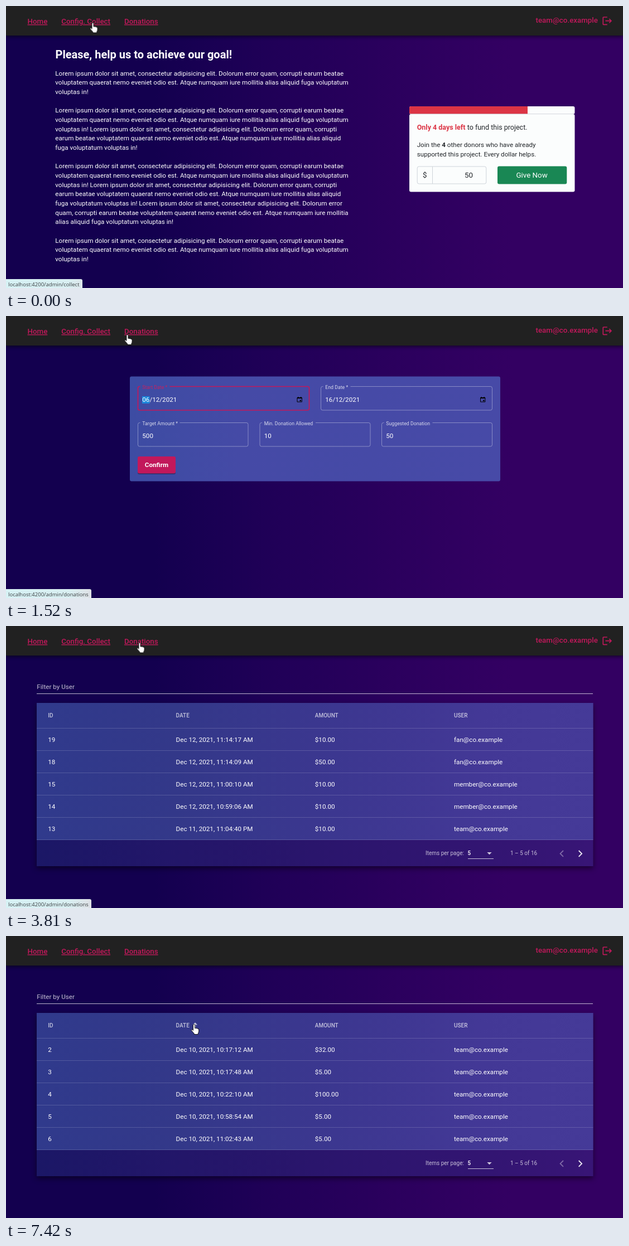
An HTML page for the animation above (8000 ms loop, 1106 px wide and 506 px high).

```html
<!DOCTYPE html>
<html lang="en">
<head>
<meta charset="utf-8">
<title>Donation admin</title>
<style>
  html, body { margin: 0; width: 100%; height: 100%; overflow: hidden; background: #1c0056; }
  body, text { font-family: Roboto, sans-serif; }
  svg { display: block; position: absolute; left: 0; top: 0; }
  text { font-size: 11.667px; fill: #fff; white-space: pre; }

  /* every change is a hard cut on one 8 s clock */
  .k { animation: 8s step-end infinite; }
  .home { animation-name: home; }
  .form { animation-name: form; }
  .panel { animation-name: panel; }
  .fields { animation-name: fields; }
  .blurred { animation-name: blurred; }
  .focused { animation-name: focused; }
  .list { animation-name: list; }
  .newest { animation-name: newest; }
  .oldest { animation-name: oldest; }
  .sort { animation-name: sort; }
  .status { animation-name: status; }
  .bar { animation-name: bar; }
  .url1 { animation-name: url1; }
  .url2 { animation-name: url2; }
  .cursor { animation-name: move; }
  .hand { animation-name: hand; }
  .arrow { animation-name: arrow; }

  @keyframes home { 0% { opacity: 1 } 6.5%, to { opacity: 0 } }
  @keyframes form { 0% { opacity: 0 } 6.5% { opacity: 1 } 47.625%, to { opacity: 0 } }
  @keyframes panel { 0% { height: 28px } 8%, to { height: 188px } }
  @keyframes fields { 0% { opacity: 0 } 8%, to { opacity: 1 } }
  @keyframes blurred { 0% { opacity: 1 } 9.5% { opacity: 0 } 44.5%, to { opacity: 1 } }
  @keyframes focused { 0% { opacity: 0 } 9.5% { opacity: 1 } 44.5%, to { opacity: 0 } }
  @keyframes list { 0% { opacity: 0 } 47.625%, to { opacity: 1 } }
  @keyframes newest { 0% { opacity: 1 } 78.5%, to { opacity: 0 } }
  @keyframes oldest { 0% { opacity: 0 } 78.5%, to { opacity: 1 } }
  @keyframes sort { 0% { opacity: 0 } 68.875% { opacity: .4 } 78.5% { opacity: .55 } 80%, to { opacity: .75 } }
  @keyframes status { 0% { opacity: 1 } 58.5%, to { opacity: 0 } }
  @keyframes bar { 0% { width: 140px } 6.5% { width: 371px } 17.5%, to { width: 156px } }
  @keyframes url1 { 0% { opacity: 1 } 17.5%, to { opacity: 0 } }
  @keyframes url2 { 0% { opacity: 0 } 17.5%, to { opacity: 1 } }
  @keyframes hand { 0% { opacity: 1 } 55.375% { opacity: 0 } 68.875%, to { opacity: 1 } }
  @keyframes arrow { 0% { opacity: 0 } 55.375% { opacity: 1 } 68.875%, to { opacity: 0 } }
  @keyframes move {
    0% { transform: translate(155.5px, 29.5px) }
    14.375% { transform: translate(160px, 30px) }
    15.875% { transform: translate(176px, 32px) }
    17.5% { transform: translate(204px, 34px) }
    19% { transform: translate(217.5px, 33px) }
    20.625% { transform: translate(226px, 32px) }
    22.125% { transform: translate(232px, 31px) }
    23.75% { transform: translate(235.5px, 30.5px) }
    25.25% { transform: translate(236.5px, 30px) }
    28.375% { transform: translate(238px, 30px) }
    29.875% { transform: translate(239px, 30px) }
    34.625% { transform: translate(239.5px, 29.5px) }
    53.875% { transform: translate(241px, 31px) }
    55.375% { transform: translate(249px, 41px) }
    57% { transform: translate(265px, 58px) }
    58.5% { transform: translate(283px, 77px) }
    59.875% { transform: translate(299px, 93px) }
    61.375% { transform: translate(310px, 106px) }
    62.875% { transform: translate(317px, 119px) }
    64.375% { transform: translate(321px, 128px) }
    65.875% { transform: translate(325px, 138px) }
    67.375% { transform: translate(330px, 147px) }
    68.875% { transform: translate(334px, 156px) }
    70.375% { transform: translate(335px, 158px) }
    92.75%, to { transform: translate(337px, 158px) }
  }

  .story { position: absolute; left: 88.3px; top: 112.5px; width: 534px; color: #fff;
           font-size: 11.667px; line-height: 16.667px; }
  .story p { margin: 0 0 16.667px; }
  .nav text { font-size: 13.333px; font-weight: 500; fill: #c2185b; }
  .nav .link { text-decoration: underline; }
  .title { font-size: 20px; font-weight: 700; }
  .card text { fill: #212529; }
  .card .big { font-size: 13.333px; }
  .card .give { font-size: 13.333px; fill: #fff; }
  .red { fill: #dc3545; }
  .bold { font-weight: 700; }
  .med { font-weight: 500; }
  .outline { fill: none; stroke: rgba(255,255,255,.36); }
  .label { font-size: 8.75px; fill: rgba(255,255,255,.78); }
  .focused .outline { stroke: #c2185b; stroke-width: 1.7; }
  .focused .label { fill: #c8205f; }
  .head { font-size: 10px; font-weight: 500; fill: rgba(255,255,255,.7); }
  .small { font-size: 10px; fill: rgba(255,255,255,.72); }
  .status text { font: 9.5px "Open Sans", sans-serif; fill: #3c4043; }
  .cursor path { fill: #fff; stroke: #000; stroke-width: .9; stroke-linejoin: round; }
</style>
</head>
<body>
<svg width="1106" height="506" viewBox="0 0 1106 506">
  <defs>
    <linearGradient id="night">
      <stop offset="0" stop-color="#13004f"/><stop offset=".24" stop-color="#13004f"/>
      <stop offset=".45" stop-color="#210058"/><stop offset=".65" stop-color="#2c005e"/>
      <stop offset=".82" stop-color="#330062"/><stop offset="1" stop-color="#330062"/>
    </linearGradient>
    <linearGradient id="indigo">
      <stop offset="0" stop-color="#3d4ca3"/><stop offset=".3" stop-color="#454aa6"/><stop offset="1" stop-color="#474aa7"/>
    </linearGradient>
    <linearGradient id="grid">
      <stop offset="0" stop-color="#303a8c"/><stop offset=".25" stop-color="#333889"/>
      <stop offset=".5" stop-color="#3b378f"/><stop offset=".8" stop-color="#433896"/><stop offset="1" stop-color="#453a98"/>
    </linearGradient>
    <linearGradient id="foot">
      <stop offset="0" stop-color="#1b1766"/><stop offset=".5" stop-color="#2a156c"/><stop offset="1" stop-color="#381576"/>
    </linearGradient>
    <linearGradient id="tip" gradientUnits="userSpaceOnUse" x1="0" x2="160" y1="0" y2="0">
      <stop offset="0" stop-color="#d6f1f4"/><stop offset=".7" stop-color="#d8eef1"/><stop offset=".95" stop-color="#dee1e6"/>
    </linearGradient>
  </defs>
  <rect width="1106" height="506" fill="url(#night)"/>

  <g class="k home">
    <text class="title" x="88.5" y="94">Please, help us to achieve our goal!</text>
    <g class="card">
      <rect x="723" y="180" width="296.5" height="14" rx="3" fill="#fbfdfd"/>
      <path class="red" d="M935 180H726q-3 0-3 3v8q0 3 3 3H935z"/>
      <rect x="723" y="194" width="296.5" height="139.5" rx="3" fill="#fbfdfd"/>
      <path d="M724 193.7H1018" stroke="#c9ccd6" stroke-width=".8"/>
      <text x="736.7" y="222" style="font-size:12.5px"><tspan class="red bold">Only 4 days left</tspan> to fund this project.</text>
      <text x="736.7" y="253">Join the <tspan class="bold">4</tspan> other donors who have already</text>
      <text x="736.7" y="270">supported this project. Every dollar helps.</text>
      <rect x="737.2" y="288" width="123.6" height="31" rx="3" fill="#fbfdfd" stroke="#ced4da"/>
      <path d="M764.5 288V319" stroke="#ced4da"/>
      <text class="big" x="747" y="308">$</text>
      <text class="big" x="822" y="308">50</text>
      <rect x="881" y="287.5" width="124.3" height="32" rx="3" fill="#198754"/>
      <text class="give" x="914.5" y="308">Give Now</text>
    </g>
  </g>

  <g class="k form">
    <rect class="k panel" x="222" y="108.5" width="664" height="188" rx="3" fill="url(#indigo)"/>
    <g class="k fields">
      <g id="fields"></g>
      <rect x="236" y="253" width="68" height="31" rx="3" opacity=".35"/>
      <rect x="236" y="252" width="68" height="30.5" rx="3" fill="#c2185b"/>
      <text class="bold" x="248.8" y="271">Confirm</text>
    </g>
  </g>

  <g class="k list">
    <text x="55.3" y="112.5" fill-opacity=".75">Filter by User</text>
    <path d="M55 121.5H1052" stroke="#fff" stroke-opacity=".72"/>
    <rect x="55" y="138" width="997.5" height="293" fill="url(#foot)" style="filter:drop-shadow(0 4px 5px rgba(0,0,0,.5))"/>
    <rect x="55" y="138" width="997.5" height="246" fill="url(#grid)"/>
    <path d="M55 183.5h997.5m-997.5 40h997.5m-997.5 40h997.5m-997.5 40h997.5m-997.5 40h997.5m-997.5 40h997.5" stroke="#fff" stroke-opacity=".16"/>
    <g id="table"></g>
    <path class="k sort" d="M335.8 159.5l3.2-3.2 3.2 3.2M339 156.5V165" fill="none" stroke="#fff" stroke-width="1.6"/>
    <text class="small" x="752" y="411">Items per page:</text>
    <text class="med" x="827.6" y="411" style="font-size:10px">5</text>
    <path d="M828 417.5H874" stroke="#fff" stroke-opacity=".72"/>
    <path d="M862.3 406h8.4l-4.2 4.2z" fill="#fff" fill-opacity=".75"/>
    <text class="small" x="904" y="411">1 – 5 of 16</text>
    <path d="M999 403l-5.4 5.4 5.4 5.4" fill="none" stroke="#fff" stroke-opacity=".36" stroke-width="1.9"/>
    <path d="M1026.7 403l5.4 5.4-5.4 5.4" fill="none" stroke="#fff" stroke-opacity=".9" stroke-width="1.9"/>
  </g>

  <g class="nav">
    <rect width="1106" height="53" fill="#212121" style="filter:drop-shadow(0 2px 3px rgba(0,0,0,.6))"/>
    <text class="link" x="38.5" y="32">Home</text>
    <text class="link" x="99.3" y="32">Config. Collect</text>
    <text class="link" x="212" y="32">Donations</text>
    <text x="949.5" y="30">team@co.example</text>
    <path transform="translate(1067.8 16.7) scale(.8333)" fill="#c2185b"
      d="M17 7l-1.4 1.4L18.2 11H8v2h10.2l-2.6 2.6L17 17l5-5zM4 5h8V3H4q-2 0-2 2v14q0 2 2 2h8v-2H4z"/>
  </g>

  <g class="k status">
    <rect class="k bar" x="-3" y="490" width="140" height="20" rx="3" fill="url(#tip)"/>
    <text class="k url1" x="4" y="502.5">localhost:4200/admin/collect</text>
    <text class="k url2" x="4" y="502.5">localhost:4200/admin/donations</text>
  </g>

  <g class="k cursor">
    <path class="k hand" d="M-1.6 1.5Q0-.7 1.6 1.5V7.4Q3 6.5 4.2 7.8 5.8 7 6.7 8.5 8.5 8 8.7 10V13Q8.5 15 7.3 16.6V18.5H.2V17L-4.5 11.7Q-5.2 9.6-3.4 9.8L-1.6 11.4Z"/>
    <path class="k arrow" d="M0 0V13.4L3.1 10.6 5.2 15.4 7.4 14.5 5.3 9.8H9.5Z"/>
  </g>
</svg>
<div class="story k home" id="story"></div>

<script>
  const $ = id => document.getElementById(id);

  const lorem = 'Lorem ipsum dolor sit amet, consectetur adipisicing elit. Dolorum error quam, ' +
    'corrupti earum beatae voluptatem quaerat nemo eveniet odio est. Atque numquam iure ' +
    'mollitia alias aliquid fuga voluptatum voluptas in! ';
  $('story').innerHTML = [1, 2, 3, 1].map(n => `<p>${lorem.repeat(n)}</p>`).join('');

  // outlined box with a gap in its top edge for the label
  const field = (x, y, w, gap, label, value) => `
    <path class="outline" d="M${x + 5 + gap} ${y}H${x + w - 3}q3 0 3 3v36.5q0 3-3 3H${x + 3}q-3 0-3-3V${y + 3}q0-3 3-3h1"/>
    <text class="label" x="${x + 7.8}" y="${y + 4.5}">${label}</text>
    <text x="${x + 7.8}" y="${y + 27.5}">${value}</text>`;
  const calendar = x => `<path d="M${x} 146.5h8.4v7.6h-8.4z" fill="none" stroke="#000"/>
    <path d="M${x} 147.3h8.4M${x + 1.8} 145v2m4.8-2v2" stroke="#000" stroke-width="1.3"/>
    <path d="M${x + 4.6} 150.6h2.4v2.2h-2.4z"/>`;
  const start = field(236.5, 126.5, 307, 52, 'Start Date *', '06/12/2021');

  $('fields').innerHTML =
    `<g class="k blurred">${start}</g>
     <g class="k focused"><rect x="244" y="144" width="13.5" height="13" fill="#1b87dc"/>${start}</g>` +
    field(564.5, 126.5, 307, 48, 'End Date *', '16/12/2021') +
    field(236.5, 191.5, 197.5, 70, 'Target Amount *', '500') +
    field(455, 191.5, 198, 95, 'Min. Donation Allowed', '10') +
    field(673.5, 191.5, 198, 86, 'Suggested Donation', '50') +
    calendar(522) + calendar(850.5);

  const columns = [75.3, 304.6, 553.8, 803];
  const row = (cells, y, cls = '') =>
    cells.map((c, i) => `<text class="${cls}" x="${columns[i]}" y="${y}">${c}</text>`).join('');
  const rows = (cls, list) => `<g class="k ${cls}">` + list.map(([id, date, sum, user], i) =>
    row([id, `Dec ${date.replace(' ', ', 2021, ')}`, `$${sum}.00`, `${user}@co.example`], 207.5 + 40 * i)).join('') + '</g>';

  $('table').innerHTML = row(['ID', 'DATE', 'AMOUNT', 'USER'], 164.3, 'head') +
    rows('newest', [
      [19, '12 11:14:17 AM', 10, 'fan'],
      [18, '12 11:14:09 AM', 50, 'fan'],
      [15, '12 11:00:10 AM', 10, 'member'],
      [14, '12 10:59:06 AM', 10, 'member'],
      [13, '11 11:04:40 PM', 10, 'team']
    ]) +
    rows('oldest', [
      [2, '10 10:17:12 AM', 32, 'team'],
      [3, '10 10:17:48 AM', 5, 'team'],
      [4, '10 10:22:10 AM', 100, 'team'],
      [5, '10 10:58:54 AM', 5, 'team'],
      [6, '10 11:02:43 AM', 5, 'team']
    ]);
</script>
</body>
</html>
```
